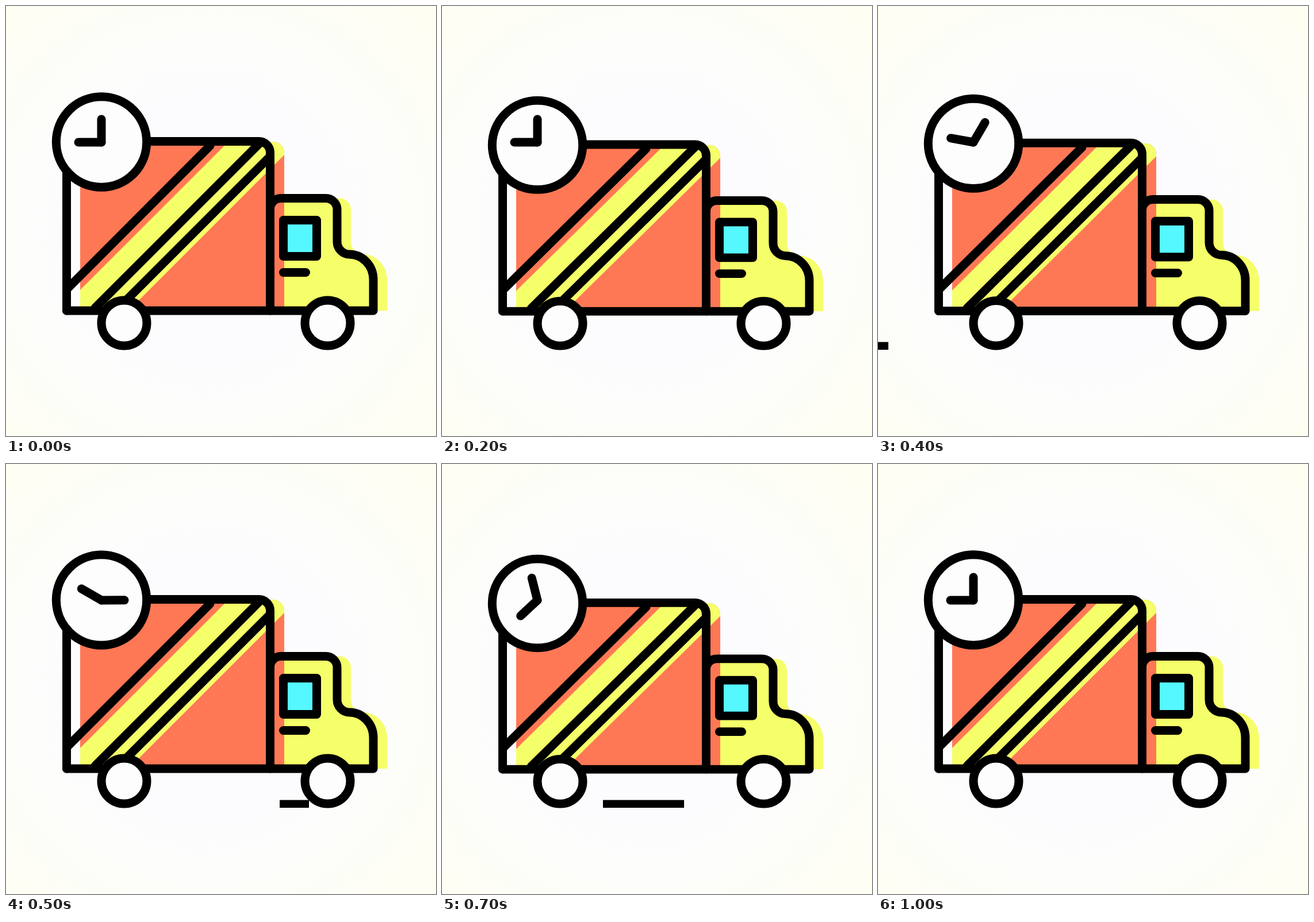
Write an HTML page that moves like this. It is 748x748 px and loops after 1050 ms.

```html
<!DOCTYPE html>
<html lang="en">
<head>
<meta charset="utf-8">
<title>Delivery truck</title>
<style>
  html, body { margin: 0; width: 100%; height: 100%; overflow: hidden; background: #fdfdfa; }
  svg { display: block; width: 100%; height: 100%; }
  .ink { fill: none; stroke: #000; stroke-width: 15; stroke-linecap: round; stroke-linejoin: round; }
  .paper { fill: #fdfdfe; }
  .yellow { fill: #f5ff69; }
  .orange { fill: #ff7855; }
  .glass { fill: #55f8ff; }
</style>
</head>
<body>
<svg viewBox="0 0 748 748">
  <defs>
    <radialGradient id="glow" gradientUnits="userSpaceOnUse" cx="350" cy="390" r="520">
      <stop offset="0" stop-color="#fcfcff"/>
      <stop offset=".45" stop-color="#fcfcfe"/>
      <stop offset="1" stop-color="#fefef3"/>
    </radialGradient>
    <clipPath id="cargo"><path d="M129 530V236H464.500A19.500 19.500 0 0 1 484 255.500V530Z"/></clipPath>
  </defs>
  <rect width="748" height="748" fill="url(#glow)"/>

  <rect id="roadBack" y="584.5" height="13.5"/>
  <rect id="roadMid" y="584.5" height="13.5"/>

  <g id="truck">
    <path class="yellow" d="M483 334.500H580.500A19.500 19.500 0 0 1 600 354V410A21.500 22 0 0 0 621.500 432A41.500 44 0 0 1 663 476V530H483Z"/>
    <g clip-path="url(#cargo)">
      <rect class="orange" x="129" y="236" width="355" height="294"/>
      <path class="yellow" d="M423 200H543L193 550H73Z"/>
    </g>
    <rect class="glass" x="482.5" y="372.5" width="58" height="63"/>
    <g class="ink">
      <path d="M105.500 493L355 243"/>
      <path d="M440 240L155 525"/>
      <path d="M458 263L200 521"/>
      <path d="M105.500 530V235.500H440A19.500 19.500 0 0 1 459.500 255V530"/>
      <path d="M459.500 353A18.500 18.500 0 0 1 478 334.500H556.500A19.500 19.500 0 0 1 576 354V410A21.500 22 0 0 0 597.500 432A41.500 44 0 0 1 639 476V530H105.500"/>
      <rect x="482.5" y="372.5" width="58" height="63"/>
      <path d="M482.500 463.500H521.500"/>
      <circle class="paper" cx="205.500" cy="551.500" r="39.500"/>
      <circle class="paper" cx="559.500" cy="551.500" r="39.500"/>
      <circle class="paper" cx="166" cy="236.500" r="78.700"/>
    </g>
  </g>

  <g class="ink">
    <path id="minute" d="M166 237V197"/>
    <path id="hour" d="M166 237V197"/>
  </g>
</svg>
<script>
  const LOOP = 1050, STEP = 50, GROUND = 598.5;
  const SQUASH = [[0, 1], [285, .981], [490, 1], [655, .981], [840, 1], [LOOP, 1]];
  const el = id => document.getElementById(id);

  function ease(t, from, to) {
    const x = Math.min(1, Math.max(0, (t - from) / (to - from)));
    return (1 - Math.cos(Math.PI * x)) / 2;
  }

  const move = (t, from, to, a, b) => a + (b - a) * ease(t, from, to);

  function keyed(keys, t) {
    const i = keys.findIndex(k => k[0] > t);
    const [t0, a] = keys[i - 1], [t1, b] = keys[i];
    return move(t, t0, t1, a, b);
  }

  function span(id, left, right) {
    el(id).setAttribute("x", left);
    el(id).setAttribute("width", Math.max(0, right - left));
  }

  const turn = (id, angle) => el(id).setAttribute("transform", `rotate(${angle} 166 237)`);

  function draw(t) {
    const s = keyed(SQUASH, t);
    el("truck").setAttribute("transform", `translate(0 ${GROUND * (1 - s)}) scale(1 ${s})`);

    turn("minute", move(t, 275, 850, 0, 270));
    turn("hour", move(t, 275, 850, 270, 360));

    // Each road line grows leftwards, then its right end catches up.
    span("roadBack", move(t, 205, 400, 140, -104), move(t, 265, 535, 140, -104));
    span("roadMid", move(t, 440, 640, 527, 280), move(t, 575, 850, 527, 280));
  }

  const start = performance.now();
  function tick() {
    const t = (performance.now() - start) % LOOP;
    draw(Math.floor(t / STEP) * STEP);
    requestAnimationFrame(tick);
  }
  tick();
</script>
</body>
</html>
```
